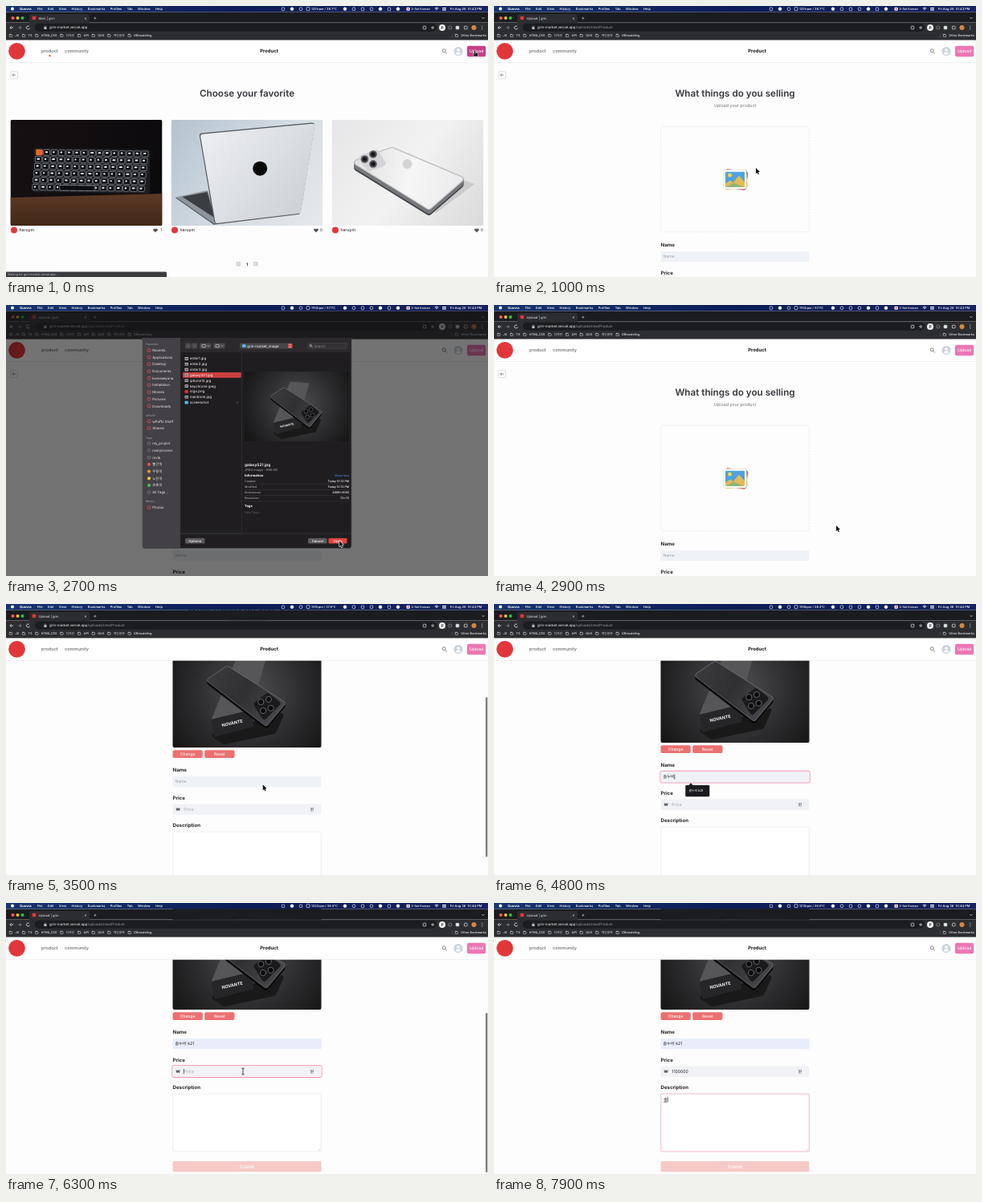
An HTML page with a canvas that plays this animation: 600x338 px, repeating every 8 s.

```html
<!DOCTYPE html>
<html lang="en">
<head>
<meta charset="utf-8">
<title>Upload | grin</title>
<style>
html, body { margin: 0; width: 100%; height: 100%; overflow: hidden; background: #fff; }
canvas { display: block; width: 600px; height: 338px; }
</style>
</head>
<body>
<canvas id="stage"></canvas>
<script>
const canvas = document.getElementById('stage');
const c = canvas.getContext('2d');
const pixels = window.devicePixelRatio || 1;
canvas.width = 600 * pixels;
canvas.height = 338 * pixels;

const LOOP = 8000, STEP = 100;
const FONT = 'Inter, "Noto Sans CJK KR", "Noto Sans CJK", sans-serif';
const PRODUCT = '솔누비 k21';
const STROKES = ['ㅅ', '소', '솔', '솔ㄴ', '솔누', '솔누ㅂ', '솔누비'];
const STRIP = '#1b1c1f', BAR = '#2c2d31', LIGHT = '#e8eaed';
const PINK = '#ec76b2', FOCUS = '#eb86a8', RED = '#e2373a', CORAL = '#ea7170';

// Drawing helpers
function text(s, x, y, size, color = '#fff', weight = 400, align = 'left') {
  c.font = `${weight} ${size}px ${FONT}`;
  c.textAlign = align;
  c.fillStyle = color;
  c.fillText(s, x, y + size * 0.36);
  return c.measureText(s).width;
}
function paint(fill, stroke, width = 0.6) {
  if (fill) { c.fillStyle = fill; c.fill(); }
  if (stroke) { c.strokeStyle = stroke; c.lineWidth = width; c.stroke(); }
}
function box(x, y, w, h, fill, r = 0, stroke, width) {
  c.beginPath();
  c.roundRect(x, y, w, h, r);
  paint(fill, stroke, width);
}
function disc(x, y, r, fill, stroke, width) {
  c.beginPath();
  c.arc(x, y, r, 0, 7);
  paint(fill, stroke, width);
}
function trace(points) {
  c.beginPath();
  for (let i = 0; i < points.length; i += 2) c.lineTo(points[i], points[i + 1]);
}
function line(color, width, ...points) {
  trace(points);
  paint(null, color, width);
}
function poly(fill, ...points) {
  trace(points);
  c.closePath();
  paint(fill);
}
function roundPoly(fill, r, ...points) {
  poly(fill, ...points);
  paint(null, fill, 2 * r);
}
function gradient(x0, y0, x1, y1, ...colors) {
  const g = c.createLinearGradient(x0, y0, x1, y1);
  colors.forEach((color, i) => g.addColorStop(i / (colors.length - 1), color));
  return g;
}
function clipped(x, y, w, h, r, draw) {
  c.save();
  c.beginPath();
  c.roundRect(x, y, w, h, r);
  c.clip();
  draw();
  c.restore();
}
function turned(x, y, angle, draw) {
  c.save();
  c.translate(x, y);
  c.rotate(angle);
  draw();
  c.restore();
}
function chevron(x, y, size, angle, color = LIGHT) {
  turned(x, y, angle, () => line(color, 0.7, -size / 2, -size, size / 2, 0, -size / 2, size));
}
function arrow(x, y, size, angle, color) {
  turned(x, y, angle, () => line(color, 0.8, -size, 0, size, 0));
  chevron(x + Math.cos(angle) * size * 0.5, y, size * 0.9, angle, color);
}
function lens(x, y, r, color) {
  disc(x, y, r, null, color, 0.9);
  line(color, 0.9, x + r * 0.75, y + r * 0.75, x + r * 1.8, y + r * 1.8);
}

// Timing helpers
const ramp = (t, a, b) => Math.min(1, Math.max(0, (t - a) / (b - a)));
const smooth = p => p * p * (3 - 2 * p);
const easeOut = p => 1 - (1 - p) ** 3;
const random = seed => Math.abs(Math.sin(seed * 12.9898 + 4.1) * 43758.5453) % 1;
const within = (t, a, b) => t >= a && t < b;
const scrollAt = t => 109 * smooth(ramp(t, 2900, 3600)) + 40 * smooth(ramp(t, 5600, 6000));
const strokesAt = (t, start) => STROKES[Math.min(6, Math.floor((t - start) / 125))] || '';

// Browser window
function menuBar(t) {
  box(0, 0, 600, 7.5, gradient(0, 0, 600, 0, '#17356f', '#0c1d56', '#16225f'));
  disc(8, 3.5, 2, '#fff');
  text('Quovra', 17, 3.5, 4.1, '#fff', 700);
  let x = 39;
  for (const menu of ['File', 'Edit', 'View', 'History', 'Bookmarks', 'Profiles', 'Tab', 'Window', 'Help'])
    x += text(menu, x, 3.5, 4, '#fff', 500) + 6.4;

  for (let i = 0; i < 14; i++) {
    const at = 345 + i * 11;
    if (within(i, 3, 7)) continue;
    if (i % 3) disc(at, 3.7, 1.9, i % 2 ? '#fff' : null, '#fff');
    else box(at - 1.7, 1.9, 3.4, 3.8, null, 1, '#fff');
  }
  const tick = Math.floor(t / 1100);
  box(374, 1.6, 4, 4, null, 0.8, '#fff');
  text(`${1187 + Math.floor(random(tick) * 24)}rpm / ${(36 + random(tick + 9) * 3.5).toFixed(1)}°C`, 380, 3.5, 3.9, '#fff', 500);

  box(498.5, 1.7, 4.2, 4, '#fff', 0.7);
  disc(500.6, 3.7, 1.1, '#d84a5b');
  text('2-Set Korean', 504.5, 3.5, 3.7, '#fff', 500);
  for (let r = 1.2; r < 4; r += 1.2) {
    c.beginPath();
    c.arc(536, 5.6, r, -2.3, -0.84);
    paint(null, '#fff', 0.7);
  }
  for (const y of [2, 4.2]) box(543, y, 5, 1.3, '#fff', 0.6);
  text(`Fri Aug 26  10:${t < 3800 ? 43 : 44} PM`, 592.5, 3.5, 4, '#fff', 500, 'right');
}

function bookmark(x, label) {
  box(x - 1.7, 35.6, 3.4, 2.8, null, 0.4, LIGHT, 0.5);
  line(LIGHT, 0.7, x - 1.7, 35.3, x, 35.3);
  return text(label, x + 5.5, 37, 3.8, LIGHT, 500);
}

function toolbarIcon(i) {
  const x = 521 + i * 10.25, y = 27;
  if (i === 1) text('☆', x, y, 5.6, LIGHT, 400, 'center');
  else if (i === 2) { disc(x + 1.5, y, 4, '#f4f4f5'); text('P', x + 1.5, y, 5, '#333', 700, 'center'); }
  else if (i === 3) disc(x + 1, y, 2, null, '#8b8d91', 0.8);
  else if (i === 6) disc(x, y, 3, '#d9863c');
  else if (i === 7) for (const dy of [-2, 0, 2]) disc(x, y + dy, 0.55, LIGHT);
  else box(x - 1.8, y - 1.8, 3.6, 3.6, i === 4 ? LIGHT : null, 0.5, LIGHT, 0.7);
}

function browser(t, dim) {
  const uploading = t >= 200;
  box(0, 7.5, 600, 13, STRIP);
  ['#ff5f57', '#febc2e', '#28c840'].forEach((color, i) => disc(8.5 + i * 6, 15, 2, color));
  box(29, 10, 75, 11, BAR, [2.5, 2.5, 0, 0]);
  box(32.8, 12.8, 4.4, 4.4, RED, 0.8);
  text(uploading ? 'Upload | grin' : 'Mart | grin', 40.5, 15.2, 4.1, LIGHT);
  text('×', 99, 15, 5, LIGHT, 400, 'center');
  text('+', 111, 15, 6.5, LIGHT, 400, 'center');
  chevron(594, 15, 1.5, Math.PI / 2);

  box(0, 20.5, 600, 22, BAR);
  arrow(7, 27, 2.2, Math.PI, LIGHT);
  arrow(17, 27, 2.2, 0, '#8b8d91');
  c.beginPath();
  c.arc(27.5, 27, 2, 0.3, 5.4);
  paint(null, LIGHT, 0.8);
  box(36, 21.8, 500, 10, STRIP, 5);
  box(47.3, 26.3, 3.2, 2.7, '#bdc1c6', 0.4);
  box(48, 24.8, 1.8, 2.4, null, 0.9, '#bdc1c6', 0.5);
  const host = text('grin-market.vercel.app', 54, 26.8, 4.4);
  if (uploading) text('/uploads/new/Product', 54 + host, 26.8, 4.4, '#9aa0a6');
  for (let i = 0; i < 8; i++) toolbarIcon(i);

  let x = 6;
  for (const name of ['JS', 'TS', 'HTML,CSS', '디자인', 'API', 'QVX', '개인공부', 'DBmodeling'])
    x += bookmark(x, name) + 11.4;
  line('#5f6368', 0.5, 555.5, 34.5, 555.5, 39.5);
  bookmark(560.8, 'Other Bookmarks');
  box(0, 7.5, 600, 35, `rgba(20,20,22,${0.68 * dim})`);
  menuBar(t);
}

// Site header
function header(listing) {
  box(0, 42, 600, 28.5, '#fff');
  box(0, 70.2, 600, 0.6, '#e6e6e8');
  disc(13.5, 56.3, 10.4, RED);
  text('product', 44, 56.3, 5.5, '#77787c', 600);
  text('community', 73, 56.3, 5.5, '#77787c', 600);
  if (listing) disc(54.5, 62, 1.2, '#e05a3c');
  text('Product', 327.5, 56.3, 5.9, '#111', 700, 'center');
  lens(545.2, 55.8, 2, '#777');
  disc(563, 56.5, 5.6, '#cbd3dd');
  disc(563, 55, 1.8, '#fff');
  box(560, 57.6, 6, 3, '#fff', [3, 3, 1, 1]);
  box(574, 49.7, 23.2, 13.6, listing ? '#c63f85' : PINK, 2);
  text('Upload', 585.6, 56.3, 5.1, '#fff', 500, 'center');
}
function backButton(y) {
  box(5.7, y - 4.3, 8.8, 8.8, '#fff', 1.5, '#c9c9cc');
  arrow(10, y, 2.3, Math.PI, '#777');
}

// Listing page: each photo is drawn in a 189 by 132 frame
function keyboardPhoto() {
  box(0, 0, 189, 132, gradient(0, 0, 189, 60, '#171012', '#0b0a0d'));
  turned(32, 35, 0.015, () => {
    box(-3, 0, 145, 55, '#1d1d21', 2);
    for (let i = 0; i < 90; i++) {
      const row = Math.floor(i / 15);
      const x = (i % 15) * 9.4 - row * 0.8, y = 2 + row * 8.7;
      box(x, y, 8, 7, i ? '#0c0d11' : '#e5642c', 1, i ? '#8f959f' : '#e5642c', 0.7);
      if (i) box(x + 2, y + 2, 2 + random(i) * 2, 2, '#e4e9f1', 0.5);
    }
    box(30, 46, 44, 6.5, '#0c0d11', 1, '#8f959f', 0.7);
  });
  poly(gradient(0, 95, 0, 132, '#5a3824', '#422818'), 0, 97, 189, 92, 189, 132, 0, 132);
}
function laptopPhoto() {
  box(0, 0, 189, 132, gradient(0, 0, 189, 132, '#b4c2cf', '#d3dbe2', '#e6e9eb'));
  roundPoly('#8f959c', 1, 8, 97, 45, 89, 58, 127, 53, 129);
  poly('#3a3d42', 14, 96, 45, 90, 54, 122);
  line('#5a5f65', 1.4, 6, 97, 53, 130, 160, 117);
  const lid = [39, 20, 175, 7, 158, 113, 57, 125];
  roundPoly('#54585d', 3.6, ...lid);
  c.translate(0.7, 0.7);
  roundPoly(gradient(40, 20, 165, 120, '#eceef0', '#dcdfe4', '#ccd0d6'), 3, ...lid);
  disc(110, 60, 9, '#0a0a0b');
}
function phonePhoto() {
  box(0, 0, 189, 132, gradient(0, 0, 189, 132, '#e6e6e8', '#f2f2f2', '#dadadb'));
  poly('#cbcbcd', 60, 75, 130, 116, 178, 80, 150, 70);
  const body = [32, 53, 75, 38, 160, 74, 121, 108];
  for (let depth = 8; depth; depth--) {
    c.translate(0, depth === 8 ? 7 : -1);
    roundPoly(depth > 6 ? '#414347' : '#76787c', 4, ...body);
  }
  roundPoly('#c9cacd', 4, ...body);
  roundPoly(gradient(30, 50, 165, 90, '#e0e0e2', '#f6f6f6', '#eaeaec'), 2.8, ...body);
  roundPoly('#d4d4d7', 4, 38, 48, 55, 41, 63, 54, 47, 60);
  for (let i = 0; i < 3; i++) {
    const a = Math.PI + i * Math.PI * 2 / 3;
    disc(48 + 7 * Math.cos(a), 49 + 7 * Math.sin(a), 4.8, '#55575c');
    disc(48 + 7 * Math.cos(a), 49 + 7 * Math.sin(a), 2.8, '#17181d');
  }
  disc(94, 55, 6, '#d3d3d6');
}
function heart(x, y) {
  for (const side of [-1.3, 1.3]) disc(x + side, y - 0.6, 1.5, '#55565a');
  poly('#55565a', x - 2.7, y, x, y + 2.8, x + 2.7, y);
}
function listing() {
  backButton(86);
  text('Choose your favorite', 300, 109, 11.7, '#36373c', 600, 'center');
  [keyboardPhoto, laptopPhoto, phonePhoto].forEach((photo, i) => {
    c.save();
    c.translate(5.5 + i * 200, 142);
    clipped(0, 0, 189, 132, 2, photo);
    disc(4.5, 137.6, 4, RED);
    text('haruym', 11, 137.6, 5.1, '#333', 500);
    heart(180.5, 137.6);
    text(i ? '0' : '1', 188.5, 137.6, 5, '#444', 500, 'right');
    c.restore();
  });
  ['‹', '›'].forEach((mark, i) => {
    box(286.5 + i * 21.5, 319, 5.6, 5.6, '#d3d4d6', 1);
    text(mark, 289.3 + i * 21.5, 321.3, 5, '#fff', 600, 'center');
  });
  text('1', 300, 322, 5, '#222', 700, 'center');
  box(0, 331.5, 200, 7, '#3a3b3f', [0, 1.5, 0, 0]);
  text('Waiting for grin-market.vercel.app...', 2, 335, 3.7, '#c4c7cc');
}

// A dark phone lying across its box, covering the given frame
function productPhoto(x, y, w, h, r) {
  clipped(x, y, w, h, r, () => {
    const scale = h / 132;
    c.translate(x + w / 2, y);
    c.scale(scale, scale);
    c.translate(-92.5, 0);
    const glow = c.createRadialGradient(95, 62, 15, 95, 62, 115);
    ['#48484a', '#2d2d2f', '#161617'].forEach((color, i) => glow.addColorStop(i / 2, color));
    box(-20, 0, 225, 132, glow);
    roundPoly('#19191a', 3, 52, 117, 135, 92, 126, 112, 64, 125);
    poly('#565658', 48, 97, 80, 19, 116, 22, 98, 85);
    poly('#262628', 48, 97, 98, 85, 101, 106, 52, 119);
    turned(74, 101.5, -0.22, () => text('NOVANTE', 0, 0, 5.4, '#f2f2f2', 700, 'center'));

    const body = [47, 48, 68, 34, 136, 77, 116, 101];
    c.translate(0, 3);
    roundPoly('#0a0a0b', 4, ...body);
    c.translate(0, -3);
    roundPoly('#68686d', 3.8, ...body);
    roundPoly(gradient(45, 40, 130, 95, '#3a3a3e', '#303033', '#47474b'), 3, ...body);
    roundPoly('#1a1a1d', 3, 104, 78, 118, 67, 131, 77, 114, 94);
    for (let i = 0; i < 4; i++) {
      const a = 0.5 + i * Math.PI / 2;
      disc(116 + 7 * Math.cos(a), 79 + 8 * Math.sin(a), 3.6, '#050507', '#7c7c82', 0.8);
    }
  });
}
function pictureIcon(x, y) {
  ['#e2574c', '#5aa58f', '#f0c65a'].forEach((color, i) =>
    turned(x, y, 0.16 - i * 0.13, () => box(-14, -11.5, 28, 23, color, 2)));
  box(x - 15, y - 12, 28, 23.5, '#fff', 2, '#d8dde2');
  clipped(x - 13, y - 10, 24, 19.5, 1, () => {
    box(x - 13, y - 10, 24, 20, '#4ea3dc');
    disc(x - 7.5, y - 5.5, 2.5, '#f7d24c');
    for (const [px, height] of [[-7, 9], [4, 15]]) poly('#e3ba55', x + px, y + 10 - height, x + px + 13, y + 10, x + px - 13, y + 10);
    poly('#8db57a', x - 13, y + 10, x - 3, y + 4, x + 11, y + 10);
  });
}

// Upload form
function caret(x, y) { line('#111', 0.6, x, y - 3.2, x, y + 3.2); }
function field(x, y, value, hint, fill, focused, showCaret = focused) {
  if (focused) box(206.9, y - 0.8, 186.2, 14.8, null, 2, FOCUS, 0.9);
  box(207.5, y, 185, 13.2, fill, 1.5);
  const width = text(value || hint, x, y + 6.5, 5.2, value ? '#222' : '#a0a4ac');
  if (showCaret) caret(x + (value ? width : 0), y + 6.6);
}
function form(t) {
  const scroll = scrollAt(t), loaded = t >= 3000;
  const bottom = 282 - scroll, base = bottom + (loaded ? 12 : 0);
  const rowY = i => base + 24 + i * 34.5;
  const onName = within(t, 3800, 5600), onPrice = within(t, 6100, 7400), onNote = t >= 7400;

  backButton(86 - scroll);
  text('What things do you selling', 300, 109 - scroll, 11.7, '#36373c', 600, 'center');
  text('Upload your product', 300, 123.7 - scroll, 5.4, '#6f7075', 400, 'center');
  if (loaded) {
    productPhoto(207.5, bottom - 132, 185, 132, 2);
    ['Change', 'Reset'].forEach((label, i) => {
      box(207.5 + i * 39.7, bottom + 3.3, 37.3, 9.7, CORAL, 2);
      text(label, 226.1 + i * 39.7, bottom + 8.1, 5, '#fff', 500, 'center');
    });
  } else {
    c.setLineDash([2, 1.6]);
    box(207.8, 150.2, 184.5, 131.6, null, 2, '#dadade');
    c.setLineDash([]);
    pictureIcon(301, 216.5);
  }

  ['Name', 'Price', 'Description'].forEach((label, i) => text(label, 207.5, rowY(i) - 7.8, 6.1, '#222', 700));
  const picked = t >= 5500;
  field(210.5, rowY(0), picked ? PRODUCT : strokesAt(t, 3800), 'Name', picked ? '#e8edfb' : '#eff2f6',
    onName, onName && !within(t, 5300, 5500));
  const digits = Math.max(0, Math.floor((t - 6300) / 100));
  field(221.3, rowY(1), '1100000'.slice(0, digits), 'Price', '#f1f2f6', onPrice);
  text('₩', 214, rowY(1) + 6.5, 5.2, '#333', 600, 'center');
  text('원', 381, rowY(1) + 6.5, 5.2, '#333', 500, 'center');

  const noteY = rowY(2);
  box(207.8, noteY, 184.5, 72, '#fff', 1.5, onNote ? FOCUS : '#e3e3e6');
  for (const size of [1, 2.5]) line('#999', 0.4, 391 - size, noteY + 70.8, 391, noteY + 70.8 - size);
  if (onNote) {
    const note = strokesAt(t, 7600);
    const width = text(note, 211, noteY + 7, 5.4, '#222');
    line('#222', 0.5, 211, noteY + 10.3, 211 + width, noteY + 10.3);
    caret(211.3 + width, noteY + 7);
  }
  box(207.5, noteY + 84, 185, 13.3, '#f6c9c7', 1.5);
  text('Submit', 300, noteY + 90.6, 5.4, '#fff', 500, 'center');

  if (within(t, 4000, 5500)) {
    poly(STRIP, 242, 226.5, 245, 223.3, 248, 226.5);
    box(238.3, 226, 30, 14.2, STRIP, 1.2);
    text(PRODUCT, 242.5, 233, 3.9, '#fff', 500);
  }
  if (within(t, 3000, 3800) || within(t, 5600, 6400)) box(597, 70 + scroll * 0.45, 2.4, 199, '#7d7d80', 1.2);
}

// File chooser
function button(x, w, label, fill, color) {
  box(x, 290.8, w, 6.8, fill, 1.4);
  text(label, x + w / 2, 294.2, 4.3, color, 500, 'center');
}
function sidebar() {
  const tagColors = { '빨간색': '#f4524f', '주황색': '#f39a37', '노란색': '#f5cf45', '초록색': '#4cc35a' };
  const sections = {
    Favorites: ['Recents', 'Applications', 'Desktop', 'Documents', 'bomsaeyuna', 'Installation', 'Movies', 'Pictures', 'Downloads'],
    wPuffo: ['wPuffo Shelf', 'Shared'],
    Tags: ['my_project', 'mistyloomer', 'rovik', ...Object.keys(tagColors), 'All Tags...'],
    Media: ['Photos'],
  };
  let y = 49;
  for (const title in sections) {
    text(title, 174, y, 3.5, '#8f8d92', 600);
    y += 7.4;
    for (const label of sections[title]) {
      if (title === 'Tags') disc(178, y, 1.8, tagColors[label], tagColors[label] || '#a5a3a8', 0.5);
      else box(176.2, y - 1.7, 3.6, 3.4, null, 0.8, '#f2555b', 0.7);
      text(label, 182.3, y, 4.3, '#f0eff1');
      y += 8.7;
    }
    y += 2.9;
  }
}
function chooserBar() {
  box(217, 40, 213, 19, '#2b292c');
  [0, Math.PI].forEach((angle, i) => {
    box(223 + i * 8, 47.5, 7.4, 7, '#48464a', 1);
    chevron(226.7 + i * 8, 51, 1.4, Math.PI - angle, '#8d8b90');
  });
  for (const x of [241, 258]) {
    box(x, 47.5, 14.6, 7, '#48464a', 1);
    box(x + 3, 49.3, 4.2, 3.4, null, 0.4, LIGHT);
    chevron(x + 11, 51, 1.2, Math.PI / 2);
  }
  box(291, 47.5, 66, 7, '#48464a', 1.2);
  box(294, 49.2, 4.6, 3.6, '#5cb9f2', 0.5);
  text('grin-market_image', 300.3, 51, 4.4);
  box(351, 48.2, 5.2, 5.6, '#e8474a', 1);
  for (const side of [-1, 1]) chevron(353.6, 51 + side * 1.4, 0.9, side * Math.PI / 2);
  box(375.5, 47.5, 49, 7, '#343236', 1.2, '#525055', 0.4);
  lens(379.3, 50.6, 1.3, '#b5b3b8');
  text('Search', 383.5, 51, 4.3, '#8d8b90');
}
function preview() {
  productPhoto(297, 83, 130, 87, 0);
  text('galaxyS21.jpg', 297, 198.8, 4.8, '#fff', 600);
  text('JPEG image - 698 KB', 297, 205.2, 4, '#a9a7ac');
  text('Information', 297, 212.8, 4.1, '#fff', 700);
  text('Show less', 427, 212.8, 3.7, '#3f8fe0', 500, 'right');
  const details = { Created: 'Today 10:12 PM', Modified: 'Today 10:12 PM', Dimensions: '4688×3096', Resolution: '72×72' };
  Object.entries(details).forEach(([label, value], i) => {
    const y = 219.6 + i * 7.2;
    text(label, 297, y, 3.6, '#c4c2c7');
    text(value, 427, y, 3.6, '#fff', 500, 'right');
    line('#464448', 0.4, 297, y + 3.6, 427, y + 3.6);
  });
  text('Tags', 297, 251, 4.1, '#fff', 700);
  text('Add Tags...', 297, 258.2, 4, '#626066');
}
function chooser(t) {
  const shown = easeOut(ramp(t, 1200, 1700)), picked = t >= 2200;
  clipped(0, 41, 600, 297, 0, () => {
    c.globalAlpha = shown;
    c.translate(0, -130 * (1 - shown));
    box(170, 40, 260, 263.5, '#1f1d20', [0, 0, 3, 3], '#555358', 0.7);
    box(170, 40, 47, 263.5, '#434146', [0, 0, 0, 3]);
    sidebar();
    chooserBar();

    const files = ['enter1.jpg', 'enter2.jpg', 'enter3.jpg', 'galaxyS21.jpg', 'iphone13.jpg', 'keychrone.jpeg', 'logo.png', 'macbook.jpg', 'screenshot'];
    files.forEach((file, i) => {
      const y = 66.8 + i * 6.84, folder = file === 'screenshot', logo = file === 'logo.png';
      if (picked && i === 3) box(220, y - 3.4, 72.8, 6.8, '#cb403d', 1);
      box(222.6, y - 1.7, 4.2, 3.6, folder ? '#5cb9f2' : logo ? RED : '#c9cbd0', 0.4);
      if (!folder && !logo) box(223.2, y - 0.8, 3, 1.8, '#55595f');
      text(file, 229, y, 4.4);
      if (folder) chevron(288, y, 1.2, 0, '#8d8b90');
    });
    line('#39373b', 0.7, 293.4, 59, 293.4, 285, 217, 285, 430, 285);
    if (picked) preview();
    button(223, 24.4, 'Options', '#5b595d', '#fff');
    button(376, 23.6, 'Cancel', '#5b595d', '#fff');
    button(401.5, 23, 'Open', picked ? '#e0443f' : '#39373b', picked ? '#fff' : '#77757a');
  });
}

// Pointer: arrival time and place of each stop
const stops = [[900, 326, 202], [2100, 246, 86], [2600, 415, 294], [2900, 426, 275],
  [3600, 300, 216], [5500, 256, 233], [6000, 295, 210], [7400, 300, 262]];

function pointer(t) {
  if (within(t, 3900, 5400) || within(t, 6400, 7100) || t >= 7500) return;
  let x = 584, y = 55;
  for (const [arrival, toX, toY] of stops) {
    const p = smooth(ramp(t, arrival - (arrival === 2900 ? 100 : 400), arrival));
    x += (toX - x) * p;
    y += (toY - y) * p;
  }
  turned(x, y, 0, () => {
    if (t < 200) {
      box(-2.2, 3, 5.6, 5, '#111', 1.5, '#fff');
      box(-1.2, 0, 1.6, 5, '#111', 0.8, '#fff', 0.4);
    } else if (within(t, 3600, 3900) || t >= 6000) {
      for (const [color, width] of [['#fff', 1.8], ['#222', 0.9]]) line(color, width, 0, -3.5, 0, 3.5);
      for (const end of [-3.8, 3.8]) line('#222', 0.8, -1.8, end, 1.8, end);
    } else {
      trace([0, 0, 0, 7.2, 1.6, 5.7, 2.7, 8.2, 3.9, 7.6, 2.8, 5.2, 5, 5]);
      c.closePath();
      paint(null, '#fff', 1.2);
      paint('#111');
    }
  });
}

function render(t) {
  c.setTransform(pixels, 0, 0, pixels, 0, 0);
  c.lineJoin = 'round';
  c.textRendering = 'geometricPrecision';
  const choosing = within(t, 1200, 2800);
  const dim = choosing ? easeOut(ramp(t, 1100, 2000)) : 0;
  box(0, 0, 600, 338, '#fefdfe');
  if (t < 200) listing(); else form(t);
  header(t < 200);
  box(0, 42, 600, 296, `rgba(0,0,0,${0.55 * dim})`);
  browser(t, dim);
  if (choosing) chooser(t);
  pointer(t);
}

const start = performance.now();
function tick() {
  const t = (performance.now() - start) % LOOP;
  render(Math.floor(t / STEP) * STEP);
  requestAnimationFrame(tick);
}
tick();
</script>
</body>
</html>
```
